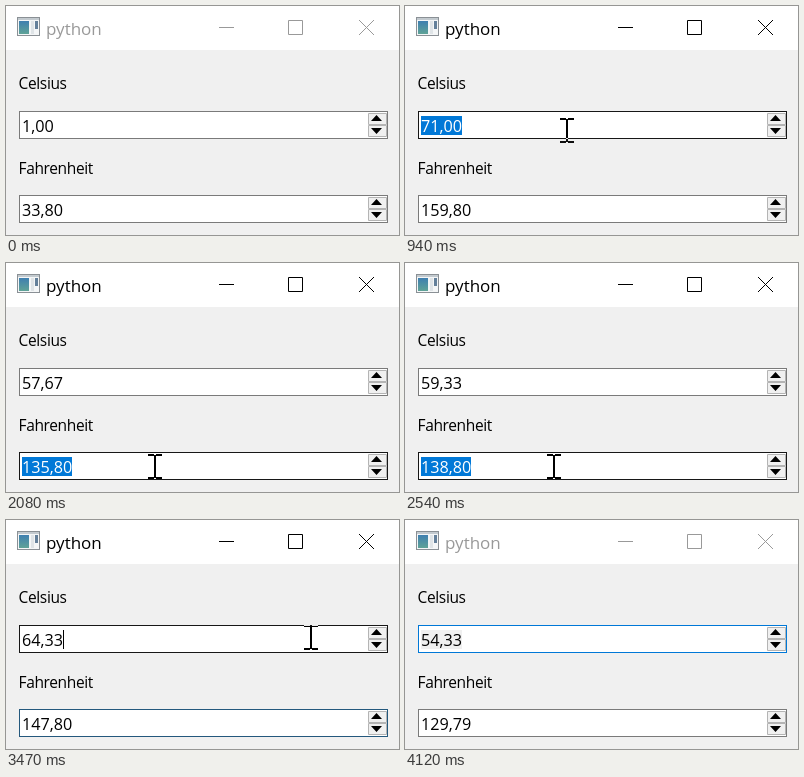
An HTML page for the animation above (4150 ms loop, 393 by 229 pixels).

```html
<!DOCTYPE html>
<html lang="en">
<head>
<meta charset="utf-8">
<title>Temperature converter</title>
<style>
  html, body { margin: 0; width: 100%; height: 100%; overflow: hidden; background: #f0f0f0; }
  svg { display: block; isolation: isolate; }
  text { font-family: "Open Sans", "Noto Sans", sans-serif; white-space: pre; }
  .label { font-size: 15.5px; letter-spacing: -.35px; }
  .value { font-size: 16.2px; }
  #beam { fill: #fff; mix-blend-mode: difference; }
</style>
</head>
<body>
<svg width="393" height="229" viewBox="0 0 393 229">
  <defs>
    <linearGradient id="pane" x2="0" y2="1">
      <stop stop-color="#3f7fb0"/><stop offset="1" stop-color="#5fa397"/>
    </linearGradient>
    <g id="spin">
      <path d="M362.5 107.5h18v11h-18zM362.5 119.5h18v11h-18z" fill="#f0f0f0" stroke="#b4b4b4"/>
      <path d="M365 115l5.5-6 5.5 6zM365 122h11l-5.5 6z"/>
    </g>
  </defs>
  <rect width="393" height="229" fill="#f0f0f0"/>
  <rect width="393" height="44" fill="#fff"/>
  <rect x="11.5" y="11.5" width="22" height="18" fill="#f4f6f7" stroke="#8a9095"/>
  <path d="M12 12h21v2h-21z" fill="#c3cacf"/>
  <rect x="13" y="15" width="10" height="13" fill="url(#pane)"/>
  <path d="M25 15h3v13h-3z" fill="#dfe4e7"/>
  <path d="M29 15h3v8h-3z" fill="#64809a"/>
  <text id="title" x="40" y="28.5" font-size="17">python</text>
  <path id="controls" fill="none" d="M213 21.5h15M282.5 14.5h14v14h-14zM353 14l15 15M368 14l-15 15"/>
  <text class="label" x="12.5" y="83">Celsius</text>
  <text class="label" x="12.5" y="168">Fahrenheit</text>
  <g id="fields"></g>
  <path id="beam" d="M-7-12h6v2h-6zM1-12h6v2h-6zM-1-11h2v23h-2zM-7 11h6v2h-6zM1 11h6v2h-6z"/>
  <path id="arrow" d="M0 0v21l5-4.500 3.500 8 3.500-1.500-3.500-7.500h7z" fill="#fff" stroke="#000"/>
</svg>
<script>
const LOOP = 4150;
const GRAY = [122, 122, 122], DARK = [23, 23, 23], BLUE = [0, 120, 215];
const $ = id => document.getElementById(id);

function makeField(dy) {
  const g = document.createElementNS('http://www.w3.org/2000/svg', 'g');
  g.setAttribute('transform', `translate(0 ${dy})`);
  g.innerHTML = `<rect x="13.5" y="105.5" width="368" height="27" fill="#fff"/>
    <use href="#spin"/><rect x="16" y="110" height="19"/>
    <text class="value" x="16" y="126"></text><rect y="110" width="1" height="19"/>`;
  const [box, , sel, text, caret] = g.children;
  $('fields').append(g);
  return { box, sel, text, caret };
}
const celsius = makeField(0), fahrenheit = makeField(84);

// Linear interpolation through rows of [time, ...values]
function track(keys, t) {
  const i = keys.findIndex(k => k[0] > t);
  if (i === 0) return keys[0].slice(1);
  if (i < 0) return keys.at(-1).slice(1);
  const a = keys[i - 1], b = keys[i], p = (t - a[0]) / (b[0] - a[0]);
  return a.slice(1).map((v, j) => v + (b[j + 1] - v) * p);
}

// Whole steps counted from 1 at t0 up to n at t1
function steps(t, t0, t1, n) {
  return t < t0 ? 0 : Math.min(n, Math.floor((t - t0) / (t1 - t0) * (n - 1)) + 1);
}

const borderC = [[190, ...GRAY], [310, ...DARK], [1150, ...DARK], [1270, 15, 62, 100],
  [1540, ...GRAY], [3350, ...GRAY], [3440, ...DARK], [3860, ...DARK], [4110, ...BLUE]];
const borderF = [[110, ...GRAY], [180, 85, 85, 85], [330, ...GRAY], [1210, ...GRAY],
  [1400, ...DARK], [2940, ...DARK], [3280, 8, 95, 165], [3350, 22, 75, 115],
  [3470, 36, 88, 125], [3800, ...GRAY]];

const visits = [
  [[100, 215, 204], [250, 168, 128], [330, 162, 124], [1120, 162, 124],
   [1270, 149, 203], [2880, 149, 203], [2980, 172, 236]],
  [[3260, 336, 228], [3380, 318, 140], [3440, 305, 117], [3810, 305, 117],
   [3850, 318, 110], [3910, 382, 208], [4000, 402, 240]]
];

function values(t) {
  if (t < 1330) {
    const c = 1 + steps(t, 640, 940, 70);
    return [c, c * 1.8 + 32];
  }
  const f = 159.8 - steps(t, 1330, 1570, 10) - steps(t, 1670, 2170, 17) + steps(t, 2350, 2830, 15);
  if (t < 3560) return [(f - 32) / 1.8, f];
  const c = 64.33 - steps(t, 3560, 3810, 10);
  return [c, c * 1.8 + 32];
}

function drawField(field, value, border, selected, caret, active) {
  const { box, sel, text } = field;
  text.textContent = value.toFixed(2).replace('.', ',');
  const width = Math.round(text.getComputedTextLength());
  text.setAttribute('fill', selected && active ? '#fff' : '#000');
  sel.setAttribute('width', selected ? width : 0);
  sel.setAttribute('fill', active ? '#0078d7' : '#f0f0f0');
  box.setAttribute('stroke', `rgb(${border.map(Math.round)})`);
  field.caret.setAttribute('x', caret === 'start' ? 16 : 16 + width);
  field.caret.setAttribute('fill', caret === 'start' ? '#ff8728' : '#000');
  field.caret.style.display = caret ? '' : 'none';
}

function drawPointer(t) {
  const path = visits.find(v => t >= v[0][0] && t < v.at(-1)[0]);
  const [x, y] = path ? track(path, t).map(Math.round) : [0, 0];
  const inside = x > 13 && x < 362 && (y > 105 && y < 133 || y > 189 && y < 217);
  for (const [id, on] of [['beam', inside], ['arrow', !inside]]) {
    $(id).style.display = path && on ? '' : 'none';
    $(id).setAttribute('transform', `translate(${x} ${y})`);
  }
}

function draw(now) {
  const t = now % LOOP;
  const within = (a, b) => t >= a && t < b;
  const active = within(250, 3970);
  const ink = active ? '#000' : '#999';
  $('title').setAttribute('fill', ink);
  $('controls').setAttribute('stroke', ink);

  const [c, f] = values(t);
  const caretC = (within(250, 490) || within(3440, 3560)) && 'end';
  const caretF = within(1270, 1330) ? 'end' : within(2200, 2350) && 'start';
  drawField(celsius, c, track(borderC, t), within(640, 1270) || t >= 3560, caretC, active);
  drawField(fahrenheit, f, track(borderF, t), within(1330, 3440), caretF, active);
  drawPointer(t);
  requestAnimationFrame(() => draw(performance.now()));
}
draw(0);
</script>
</body>
</html>
```
